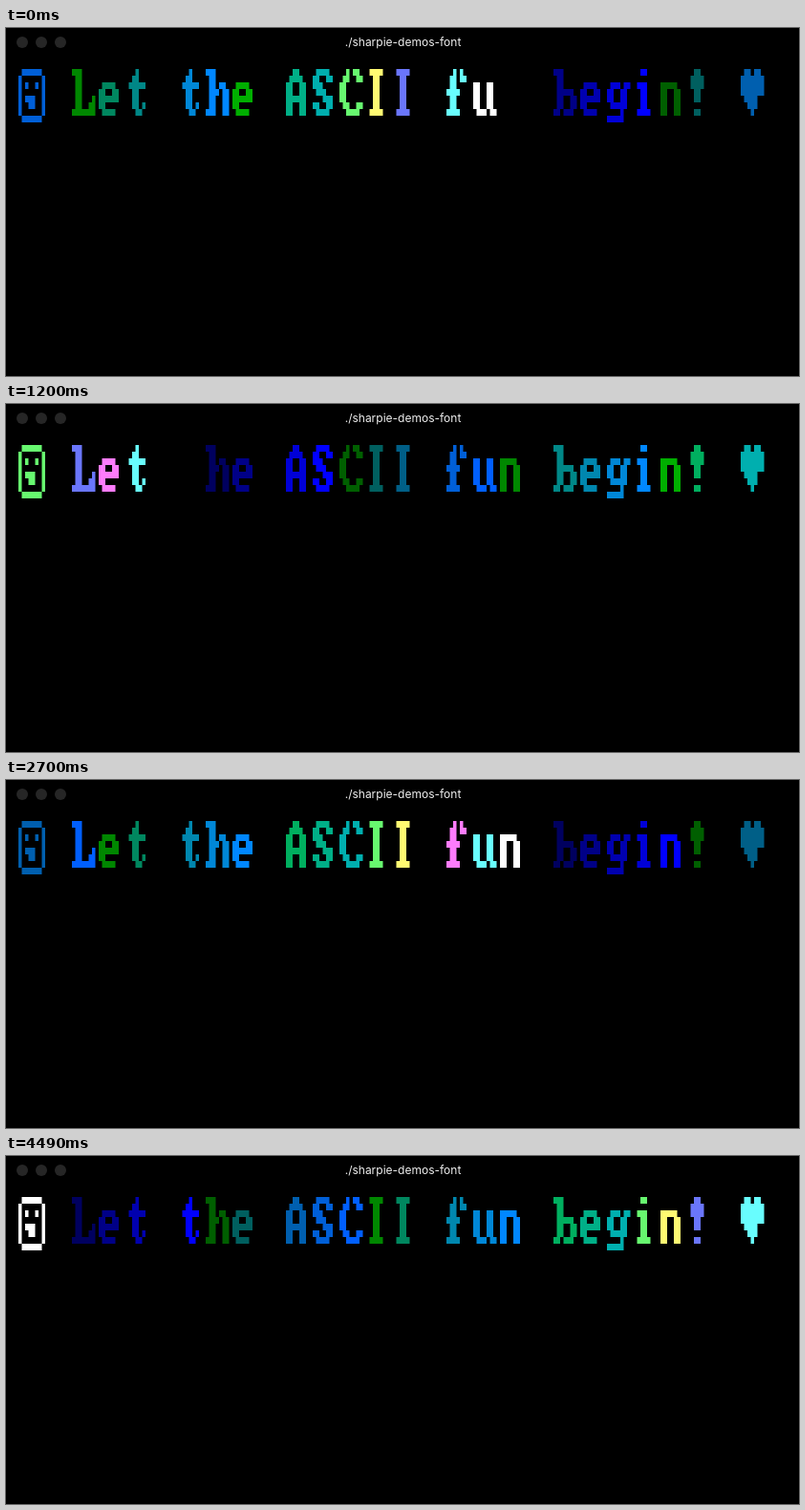
An HTML page that plays this animation: 830 px wide and 365 px high, repeating every 4510 ms.

```html
<!DOCTYPE html>
<html lang="en">
<head>
<meta charset="utf-8">
<title>./sharpie-demos-font</title>
<style>
  html, body { margin: 0; width: 100%; height: 100%; overflow: hidden; background: #000; }
  svg { display: block; }
  text { font: 12px Inter, sans-serif; fill: #f0f0f0; text-anchor: middle; }
</style>
</head>
<body>
<svg width="830" height="365" viewBox="0 0 830 365">
  <g fill="#262626">
    <circle cx="17" cy="15" r="6"/>
    <circle cx="37" cy="15" r="6"/>
    <circle cx="57" cy="15" r="6"/>
  </g>
  <text x="415.5" y="19">./sharpie-demos-font</text>
  <g id="banner" transform="translate(13 43) scale(3.5 7)"></g>
</svg>
<script>
const MESSAGE = '☺ Let the ASCII fun begin! ♥';
const LOOP = 4510;
const STEP = 150;

// Letter outlines on an 8 by 8 grid
const GLYPHS = {
  '☺': 'M1 0h6v1h-6zM0 1h1v6h-1zM7 1h1v6h-1zM1 7h6v1h-6zM2 2h1v1h-1zM5 2h1v1h-1zM2 4h3v2h-2v-1h-1z',
  'L': 'M0 0h3v6h2v-1h1v-1h1v3h-7v-1h1v-5h-1z',
  'e': 'M1 2h4v1h1v2h-4v1h3v1h-4v-1h-1v-3h1zM2 3v1h2v-1z',
  't': 'M3 0h1v2h2v1h-2v3h1v1h-2v-1h-1v-3h-1v-1h1v-1h1zM5 5h1v1h-1z',
  'h': 'M0 0h3v3h1v-1h2v1h1v4h-2v-4h-1v1h-1v3h-3v-1h1v-5h-1z',
  'A': 'M2 0h2v1h1v1h1v5h-2v-2h-2v2h-2v-5h1v-1h1zM2 2v2h2v-2z',
  'S': 'M1 0h4v1h1v1h-2v-1h-2v1h1v1h1v1h2v2h-1v1h-4v-1h-1v-1h2v1h2v-1h-1v-1h-2v-1h-1v-2h1z',
  'C': 'M2 0h1v2h-1v3h1v1h2v-1h2v1h-1v1h-4v-1h-1v-1h-1v-3h1v-1h1zM4 0h2v1h1v1h-2v-1h-1z',
  'I': 'M1 0h4v1h-1v5h1v1h-4v-1h1v-5h-1z',
  'f': 'M2 0h1v3h1v1h-1v2h1v1h-4v-1h1v-2h-1v-1h1v-2h1zM4 0h1v1h1v1h-2z',
  'u': 'M0 2h2v4h2v-4h2v4h1v1h-2v-1h-1v1h-3v-1h-1z',
  'n': 'M0 2h5v1h1v4h-2v-4h-2v4h-2z',
  'b': 'M0 0h3v3h3v1h1v2h-1v1h-3v-1h-1v1h-2v-1h1v-5h-1zM3 4v2h2v-2z',
  'g': 'M1 2h3v1h1v-1h2v1h-1v3h-1v2h-5v-1h4v-1h-3v-1h-1v-2h1zM2 3v2h2v-2z',
  'i': 'M2 0h2v1h-2zM1 2h3v4h1v1h-4v-1h1v-3h-1z',
  '!': 'M2 0h2v1h1v2h-1v2h-2v-2h-1v-2h1zM2 6h2v1h-2z',
  '♥': 'M1 0h2v1h1v-1h2v1h1v3h-2v2h-1v1h-1v-1h-1v-1h-1v-1h-1v-3h1z'
};

// Terminal colours 10 to 37: six bright ones, then the start of the colour cube
const LEVELS = [0, 95, 135, 175, 215, 255];
const PALETTE = ['#67f86f', '#fffa72', '#6a76fb', '#fd7cfc', '#68fdfe', '#fff'];
for (let n = 0; n < 22; n++) {
  PALETTE.push(`rgb(0, ${LEVELS[Math.floor(n / 6)]}, ${LEVELS[n % 6]})`);
}

const banner = document.getElementById('banner');
const letters = [...MESSAGE].map((char, i) => {
  const path = document.createElementNS('http://www.w3.org/2000/svg', 'path');
  path.setAttribute('d', GLYPHS[char] || '');
  path.setAttribute('transform', `translate(${i * 8} 0)`);
  return banner.appendChild(path);
});

function draw() {
  const time = performance.now() % LOOP;
  // The step that begins at 3750 ms is 10 ms short
  const step = Math.floor((time + (time >= 3750 ? 10 : 0)) / STEP);
  const shift = 16 + Math.floor(step * 1.5);
  letters.forEach((letter, i) => {
    letter.setAttribute('fill', PALETTE[(i + shift) % PALETTE.length]);
  });
  requestAnimationFrame(draw);
}
draw();
</script>
</body>
</html>
```
